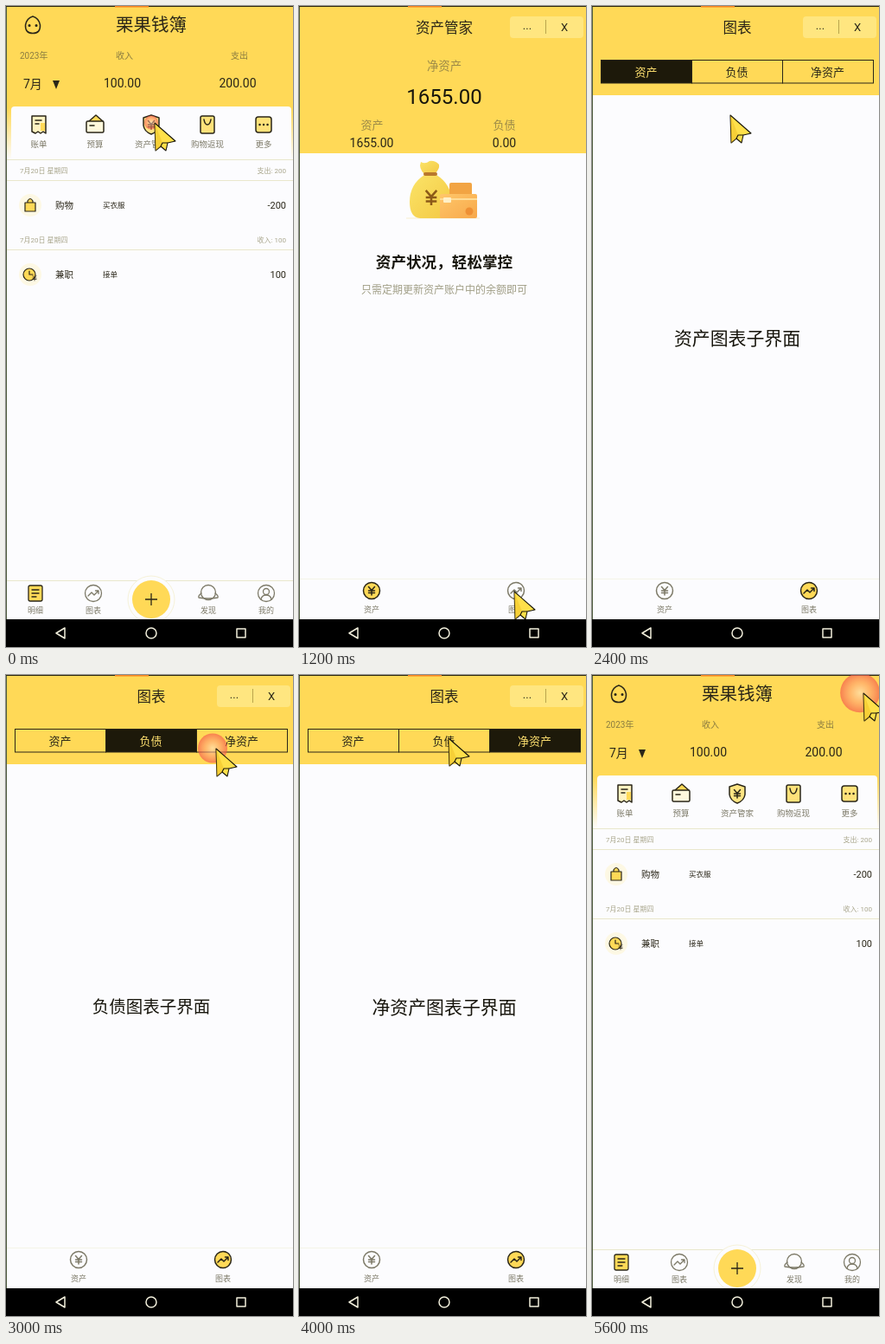
An HTML page for the animation above (5.8 s loop, 332 px wide and 740 px high).

```html
<!DOCTYPE html>
<html lang="zh-CN">
<head>
<meta charset="utf-8">
<title>记账</title>
<style>
html, body { margin: 0; width: 100%; height: 100%; overflow: hidden; background: #fcfcfe; }
svg { display: block; width: 332px; height: 740px; }
text { font-family: Roboto, "Noto Sans CJK SC", "Noto Sans CJK", sans-serif; }
</style>
</head>
<body>
<svg id="stage" viewBox="0 0 332 740">
  <defs>
    <linearGradient id="fade" x1="0" y1="0" x2="0" y2="1">
      <stop offset="0" stop-color="#ffd957"/>
      <stop offset="1" stop-color="#fcfcfe"/>
    </linearGradient>
    <linearGradient id="gold" x1="0" y1="0" x2="1" y2="1">
      <stop offset="0" stop-color="#fbe468"/>
      <stop offset="1" stop-color="#f3c843"/>
    </linearGradient>
    <linearGradient id="orange" x1="0" y1="0" x2="1" y2="1">
      <stop offset="0" stop-color="#ffc76a"/>
      <stop offset="1" stop-color="#f7a84a"/>
    </linearGradient>
    <radialGradient id="glow">
      <stop offset="0" stop-color="#ffe0d0" stop-opacity=".55"/>
      <stop offset=".5" stop-color="#ff9a78" stop-opacity=".55"/>
      <stop offset="1" stop-color="#f4524a" stop-opacity=".65"/>
    </radialGradient>
  </defs>
  <g id="screens"></g>
  <g id="frame"></g>
  <circle id="ripple" fill="url(#glow)"/>
  <g id="cursor" stroke="#16140a" stroke-width="1.1" stroke-linejoin="round">
    <path d="M0 0 24 21 15 23 13 32 7 27 1 32Z" fill="#ffe04a"/>
    <path d="M0 0 9 23 7 27 1 32Z" fill="#f0c024" stroke="none" opacity=".5"/>
    <path d="M7 27 9 23 15 23" fill="none"/>
  </g>
</svg>
<script>
const LOOP = 5800, STEP = 200;
const YELLOW = '#ffd957', INK = '#2a2618', OLIVE = '#8a7c40', GRAY = '#7d7a68', PALE = '#a9a68c', WHITE = '#fcfcfe';
const $ = id => document.getElementById(id);

// cy is the optical centre of the line of text
const text = (s, x, cy, size, fill = INK, anchor = 'middle', weight = 400) =>
  `<text x="${x}" y="${cy + size * 0.36}" font-size="${size}" fill="${fill}" text-anchor="${anchor}" font-weight="${weight}">${s}</text>`;
const rect = (x, y, w, h, fill, extra = '') =>
  `<rect x="${x}" y="${y}" width="${w}" height="${h}" fill="${fill}" ${extra}/>`;
const circle = (x, y, r, fill, extra = '') =>
  `<circle cx="${x}" cy="${y}" r="${r}" fill="${fill}" ${extra}/>`;
const path = (d, fill = 'none', extra = '') => `<path d="${d}" fill="${fill}" ${extra}/>`;
const rule = (y, color = '#e9e7cc') => path(`M1 ${y}H332`, 'none', `stroke="${color}"`);
const icon = (x, y, body, color = INK, width = 1.5) =>
  `<g transform="translate(${x} ${y})" fill="none" stroke="${color}" stroke-width="${width}" stroke-linejoin="round" stroke-linecap="round">${body}</g>`;

const YEN = 'M-3.5-4.5 0-.5 3.5-4.5M0-.5V5M-3.5 0H3.5M-3.5 2.5H3.5';
const TREND = 'M-6 3-2-1 1 2 6-3M2.5-3H6V.5';
const BAG = 'M-6-3H6V7H-6ZM-3-3V-5Q0-10 3-5V-3';

const coin = (x, glyph, on) => icon(x, 675,
  circle(0, 0, 9.5, on ? YELLOW : 'none') + path(glyph), on ? INK : GRAY);

const shortcuts = [
  ['账单', path('M-8-10H8V10L5 8 2 10-1 8-4 10-8 8Z', '#fff3c2') + rect(2, -2, 5, 9, YELLOW, 'stroke="none"') + path('M-4-5H3M-4-1H0')],
  ['预算', path('M-7-4 1-11 9-4', YELLOW) + rect(-10, -4, 20, 13, '#fff8dc', 'rx="1.5"') + path('M-6 1H-1')],
  ['资产管家', path('M0-11 9-8V1Q8 8 0 11-8 8-9 1V-8Z', '#ffe583') + path(YEN)],
  ['购物返现', rect(-8, -10, 16, 20, '#ffe27a', 'rx="2"') + path('M-4-6Q-3 0 0 0 3 0 4-6')],
  ['更多', rect(-9, -9, 18, 18, '#ffe27a', 'rx="3"') + path('M-4.5 0h.1M0 0h.1M4.5 0h.1', 'none', 'stroke-width="2.4"')]
];

const homeTabs = [
  [34, '明细', rect(-8, -9, 16, 18, YELLOW, 'rx="2"') + path('M-4-4H4M-4 0H4M-4 4H1'), INK],
  [101, '图表', circle(0, 0, 9.5, 'none') + path(TREND), GRAY],
  [234, '发现', circle(0, -1, 8.5, 'none') + path('M-8 0Q-12 3-11 5 0 7 11 5 12 3 8 0'), GRAY],
  [301, '我的', circle(0, 0, 9.5, 'none') + circle(0, -2, 3.5, 'none') + path('M-6 7Q-5 2 0 2 5 2 6 7'), GRAY]
];

const entry = (y, sum, kind, note, amount, glyph) =>
  text('7月20日 星期四', 16, y, 8, PALE, 'start') + text(sum, 324, y, 8, PALE, 'end') + rule(y + 11.5) +
  circle(28, y + 40, 13, '#fdf8e4') + icon(28, y + 40, glyph, INK, 1.2) +
  text(kind, 57, y + 40, 10.5, INK, 'start') + text(note, 112, y + 40, 8.5, INK, 'start') +
  text(amount, 324, y + 40, 11, INK, 'end');

function home() {
  return rect(0, 0, 332, 118, YELLOW) + rect(0, 118, 332, 60, 'url(#fade)') +
    icon(31, 22, path('M0-10Q7-8 8.5 0 9 9.5 0 9.5-9 9.5-8.5 0-7-8 0-10Z') +
      path('M-4 .5h.1M4 .5h.1', 'none', 'stroke-width="3"')) +
    text('栗果钱簿', 168, 22, 20.5, INK, 'middle', 300) +
    text('2023年', 16, 57, 10, OLIVE, 'start') + text('收入', 137, 57, 10, OLIVE) + text('支出', 270, 57, 10, OLIVE) +
    text('7月', 20, 90, 14, INK, 'start') + path('M54 86H62L58 96Z', INK) +
    text('100.00', 134.5, 89, 14) + text('200.00', 268, 89, 14) +
    rect(6, 116, 324, 62, WHITE, 'rx="4"') +
    shortcuts.map(([label, glyph], i) =>
      icon(38 + 65 * i, 137, glyph) + text(label, 38 + 65 * i, 160, 9.5, GRAY)).join('') +
    rule(177.5) +
    entry(190, '支出: 200', '购物', '买衣服', '-200', path(BAG, YELLOW)) +
    entry(270, '收入: 100', '兼职', '接单', '100',
      circle(-1, 0, 7, YELLOW) + path('M-1-4V0H3') + `<g transform="translate(5 4) scale(.6)">${path(YEN)}</g>`) +
    rule(663.5) + circle(168, 685, 27, WHITE, 'stroke="#f6f2d8"') + circle(168, 685, 22, YELLOW) +
    path('M161 685H175M168 678V692', 'none', `stroke="${INK}" stroke-width="1.3"`) +
    homeTabs.map(([x, label, glyph, color]) =>
      icon(x, 678, glyph, color, 1.3) + text(label, x, 698, 9, GRAY)).join('');
}

const subPage = (title, headerHeight, chartOn) =>
  rect(0, 0, 332, headerHeight, YELLOW) + text(title, 168, 25, 16.5) +
  rect(244, 12, 85, 25, '#ffe680', 'rx="4"') +
  text('...', 264, 22, 13) + path('M285.5 16V32', 'none', 'stroke="#b9a44c"') + text('X', 307, 24, 13) +
  rule(661.5, '#f5f4e8') + coin(84, YEN, !chartOn) + coin(251, TREND, chartOn) +
  text('资产', 84, 697, 9, GRAY) + text('图表', 251, 697, 9, GRAY);

const moneyBag = () =>
  path('M124 245H209', 'none', 'stroke="#f9f5e6" stroke-width="2"') +
  path('M141 180Q146 183 151 179 157 178 162 183 163 188 157 194H145Q138 187 141 180Z', 'url(#gold)') +
  path('M145 195Q128 206 128 226 128 244 140 245H166Q178 243 177 224 175 205 159 195Z', 'url(#gold)') +
  rect(144, 192, 16, 4, '#b9782c', 'rx="2"') +
  rect(174, 204, 26, 16, '#f2a443', 'rx="2"') +
  rect(163, 217, 43, 28, 'url(#orange)', 'rx="2"') +
  path('M163 223H206', 'none', 'stroke="#ffdc96" stroke-width="2"') +
  rect(167, 221, 9, 6, '#fff0c8', 'rx="1"') + circle(197, 237, 4.5, '#ee9034') +
  `<g transform="translate(153 221) scale(1.8)" stroke="#8c5a18" stroke-width="1.4">${path(YEN)}</g>`;

function assets() {
  return subPage('资产管家', 170, false) +
    text('净资产', 168, 69, 13.4, '#9c8a48') + text('1655.00', 168, 104.5, 24, '#17150c') +
    text('资产', 84.5, 137, 13, '#9c8a48') + text('1655.00', 84, 158, 14) +
    text('负债', 237.5, 137, 13, '#9c8a48') + text('0.00', 237.5, 158, 14) +
    moneyBag() +
    text('资产状况，轻松掌控', 168, 296, 17.6, '#17150c', 'middle', 700) +
    text('只需定期更新资产账户中的余额即可', 168, 328, 12, '#a09e86');
}

function chart(active) {
  const tabs = ['资产', '负债', '净资产'];
  return subPage('图表', 103, true) +
    tabs.map((label, i) =>
      rect(10.5 + 105 * i, 62.5, 105, 26.5, i === active ? '#1d190a' : 'none', `stroke="${INK}"`) +
      text(label, 62.5 + 105 * i, 76, 13, i === active ? '#ffe170' : INK)).join('') +
    text(tabs[active] + '图表子界面', 168, 383, active === 1 ? 19.5 : 20.9, '#17150c');
}

const screens = [home(), assets(), chart(0), chart(1), chart(2)];
$('screens').innerHTML = screens.map(s => `<g>${s}</g>`).join('');
$('frame').innerHTML =
  rect(0, 0, 1, 708, '#4c5a3c') + rect(0, 0, 332, 1, '#2c2810') + rect(126, 0, 39, 1.5, '#f58220') +
  rect(0, 708, 332, 32, '#000') +
  icon(168, 724, path('M-100-6V6L-110 0Z') + circle(0, 0, 6, 'none') + rect(99, -5, 10, 10, 'none'), '#f2efdc');

// [time, screen index]
const pages = [[0, 0], [400, 1], [2000, 2], [2800, 3], [3200, 4], [5600, 0]];
// [time, x, y] of the pointer tip
const route = [
  [0, 172, 135], [400, 172, 135], [1200, 249, 676], [1400, 252, 686], [1600, 249, 680], [2000, 249, 680],
  [2400, 160, 126], [2600, 168, 76], [2800, 243, 85], [3200, 243, 85], [3600, 146, 88],
  [4000, 173, 73], [4600, 312, 16], [4800, 314, 21], [LOOP, 314, 21]
];
// [start, end] of each tap ripple
const taps = [[0, 400], [1600, 2200], [2450, 2700], [2800, 3300], [5270, LOOP]];

function pointerAt(t) {
  const i = route.findIndex(p => p[0] > t);
  const [t0, x0, y0] = route[i - 1], [t1, x1, y1] = route[i];
  const u = (t - t0) / (t1 - t0), k = u * u * (3 - 2 * u);
  return [x0 + (x1 - x0) * k, y0 + (y1 - y0) * k];
}

function render(time) {
  const t = Math.floor(time % LOOP / STEP) * STEP;
  const page = pages.filter(p => p[0] <= t).pop()[1];
  [...$('screens').children].forEach((g, i) => { g.style.display = i === page ? '' : 'none'; });

  const [x, y] = pointerAt(t);
  $('cursor').setAttribute('transform', `translate(${x} ${y})`);

  const tap = taps.find(([start, end]) => t >= start && t < end);
  const ripple = $('ripple');
  ripple.setAttribute('cx', x - 4);
  ripple.setAttribute('cy', y - 0.5);
  ripple.setAttribute('r', tap ? 8 + (t - tap[0]) * 0.045 : 0);
}

const start = performance.now();
function tick() {
  render(performance.now() - start);
  requestAnimationFrame(tick);
}
tick();
</script>
</body>
</html>
```
